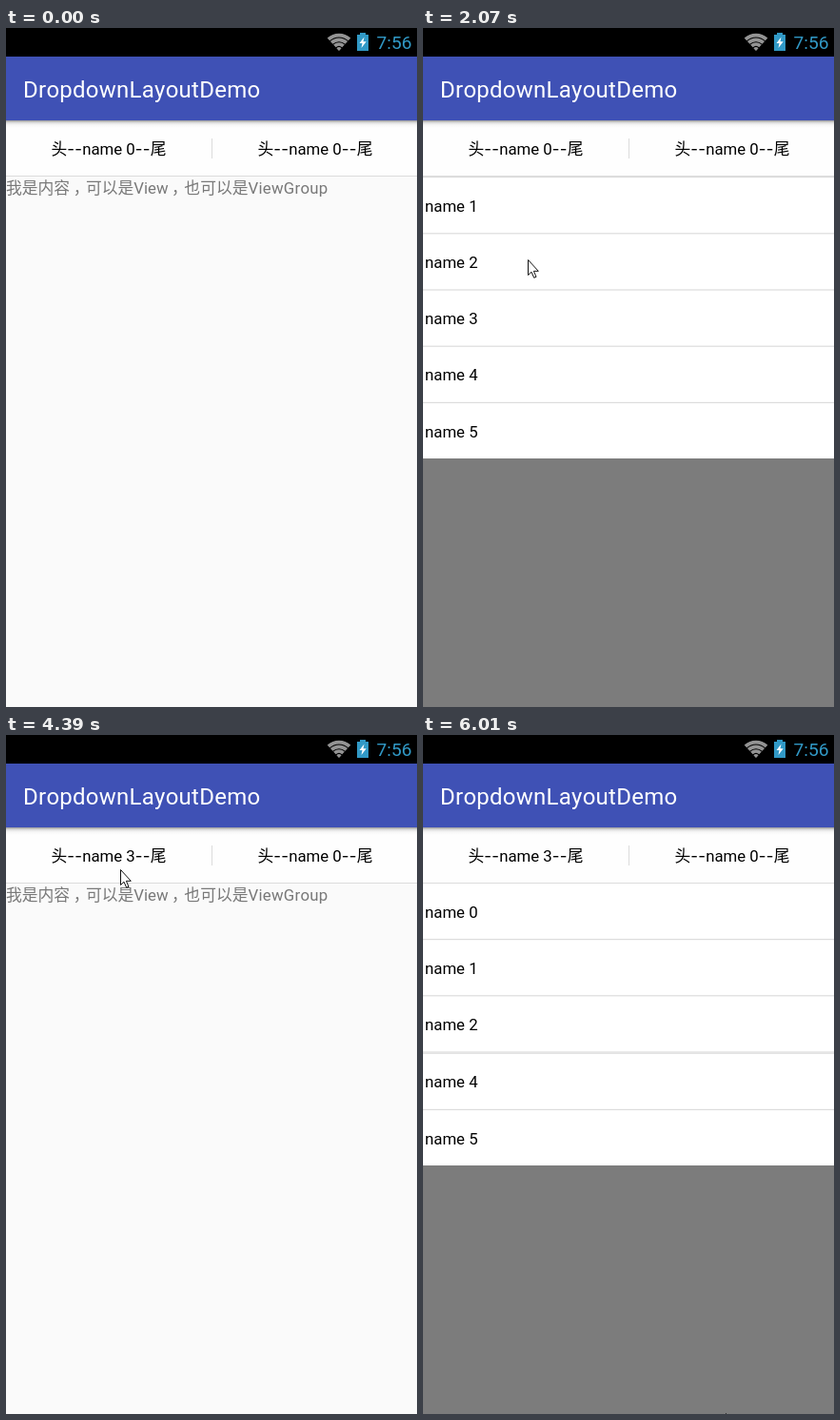
An HTML page for the animation above (6790 ms loop, 432x713 px).

```html
<!DOCTYPE html>
<html lang="zh-CN">
<head>
<meta charset="utf-8">
<title>DropdownLayoutDemo</title>
<style>
  html, body { margin: 0; width: 100%; height: 100%; overflow: hidden; background: #fafafa; }
  svg { display: block; width: 432px; height: 713px; }
  text { font: 16.8px Roboto, "Noto Sans CJK SC", "Noto Sans CJK", sans-serif; font-kerning: none; }
  .title { font-size: 24px; letter-spacing: .25px; fill: #fff; }
  .clock { font-size: 19.2px; fill: #3199c6; }
  .content { fill: #787878; }
  .wide { letter-spacing: .25px; }
  .label { text-anchor: middle; }
  .dash { font-family: Inter, sans-serif; letter-spacing: .2px; }
  .line { fill: #dcdcdc; }

  .mask, .menu, .before, .after, .cursor { animation: 6790ms step-end infinite; }
  .mask { animation-name: mask; }
  .menu { animation-name: menu; transform-origin: 0 156px; }
  .before { animation-name: before; }
  .after { animation-name: after; }
  .cursor { animation-name: cursor; }

  @keyframes mask {
    0%, 54.49% { opacity: 0; }
    14.43%, 68.04% { opacity: .5; }
    53.31% { opacity: .38; }
    100% { opacity: .5; }
  }
  @keyframes menu {
    0%, 54.49% { transform: scaleY(0); }
    14.43%, 68.04% { transform: scaleY(.1588); }
    15.75%, 69.21%, 100% { transform: scaleY(1); }
    53.31% { transform: scaleY(.9324); }
  }
  @keyframes before {
    0% { visibility: visible; }
    53.31%, 100% { visibility: hidden; }
  }
  @keyframes after {
    0% { visibility: hidden; }
    53.31%, 100% { visibility: visible; }
  }
  @keyframes cursor {
    0% { transform: translate(314px, 720px); }
    1.84% { transform: translate(314px, 639px); animation-timing-function: steps(3); }
    5.25% { transform: translate(150px, 300px); animation-timing-function: steps(2); }
    7.52% { transform: translate(75px, 140px); animation-timing-function: steps(2); }
    9.8% { transform: translate(83px, 118px); }
    21.28% { transform: translate(83px, 118px); animation-timing-function: steps(5, start); }
    27% { transform: translate(104px, 360px); animation-timing-function: steps(4, start); }
    31.57% { transform: translate(110px, 243px); }
    32.62% { transform: translate(110px, 243px); animation-timing-function: steps(5, start); }
    38.32% { transform: translate(100px, 396px); animation-timing-function: steps(4, start); }
    42.88% { transform: translate(101px, 256px); }
    43.1% { transform: translate(101px, 255px); }
    45.17% { transform: translate(101px, 255px); animation-timing-function: steps(4, start); }
    49.73% { transform: translate(99px, 308px); }
    56.62% { transform: translate(99px, 308px); animation-timing-function: steps(8, start); }
    65.71% { transform: translate(120px, 141px); }
    80.63% { transform: translate(120px, 141px); animation-timing-function: steps(8, start); }
    89.61%, 100% { transform: translate(318px, 712px); }
  }
</style>
</head>
<body>
<svg viewBox="0 0 432 713">
  <defs>
    <linearGradient id="shadow" x2="0" y2="1">
      <stop stop-opacity=".4"/>
      <stop offset=".3" stop-opacity=".13"/>
      <stop offset=".6" stop-opacity=".03"/>
      <stop offset="1" stop-opacity="0"/>
    </linearGradient>
  </defs>
  <rect width="432" height="713" fill="#fafafa"/>
  <text class="content" x="0" y="174">我是内容<tspan dx="3.5">，</tspan><tspan dx="-3.5">可以是View</tspan><tspan dx="3.5">，</tspan><tspan dx="-3.5">也可以是</tspan><tspan class="wide">ViewGroup</tspan></text>

  <rect class="mask" y="156" width="432" height="557"/>
  <g class="menu">
    <rect y="156" width="432" height="296" fill="#fff"/>
    <g class="before" id="rowsBefore"></g>
    <g class="after" id="rowsAfter"></g>
  </g>

  <rect y="97" width="432" height="58" fill="#fefefe"/>
  <rect class="line" y="155" width="432" height="1"/>
  <rect class="line" x="216" y="116" width="1" height="21"/>
  <g id="labels"></g>

  <rect y="97" width="432" height="8" fill="url(#shadow)"/>
  <rect y="30" width="432" height="67" fill="#3f51b5"/>
  <text class="title" x="18" y="73">DropdownLayoutDemo</text>

  <rect width="432" height="30"/>
  <g id="wifi" fill="none" stroke="#949494" stroke-width="3.7"></g>
  <path d="M372 5h6v2h3v17h-12V7h3z" fill="#3199c6"/>
  <path d="M376.5 9.500l-5 6.500h3l-1 5 5.200-6.800h-3.200z" fill="#fff"/>
  <text class="clock" x="389.500" y="22">7:56</text>

  <g class="cursor">
    <path d="M.5 .5V16.500L4 13.200L6.700 19.300L9 18.300L6.400 12.300H11.300Z" fill="#fff" stroke="#111"/>
  </g>
</svg>
<script>
  const byId = id => document.getElementById(id);
  const ROW = 58, DIVIDER = 1.2;

  // The selected row collapses but keeps its divider.
  function menuRows(selected) {
    let y = 156, out = '';
    for (let i = 0; i < 6; i++) {
      if (i !== selected) {
        out += `<text x="2" y="${y + 35.6}">name ${i}</text>`;
        y += ROW;
      }
      if (i < 5) {
        out += `<rect class="line" y="${y}" width="432" height="${DIVIDER}"/>`;
        y += DIVIDER;
      }
    }
    return out;
  }

  const dashes = '<tspan class="dash">--</tspan>';
  const label = (x, n, state = '') =>
    `<text class="label ${state}" x="${x}" y="133">头${dashes}name ${n}${dashes}尾</text>`;

  // Ring sector centred on the bottom tip of the fan.
  function wifiArc(r) {
    const dx = r * Math.sin(0.74), y = 24 - r * Math.cos(0.74);
    return `<path d="M${350 - dx} ${y}A${r} ${r} 0 0 1 ${350 + dx} ${y}"/>`;
  }

  byId('rowsBefore').innerHTML = menuRows(0);
  byId('rowsAfter').innerHTML = menuRows(3);
  byId('labels').innerHTML = label(108, 0, 'before') + label(108, 3, 'after') + label(325, 0);
  byId('wifi').innerHTML = [16.4, 11.6, 6.8, 2].map(wifiArc).join('');
</script>
</body>
</html>
```
